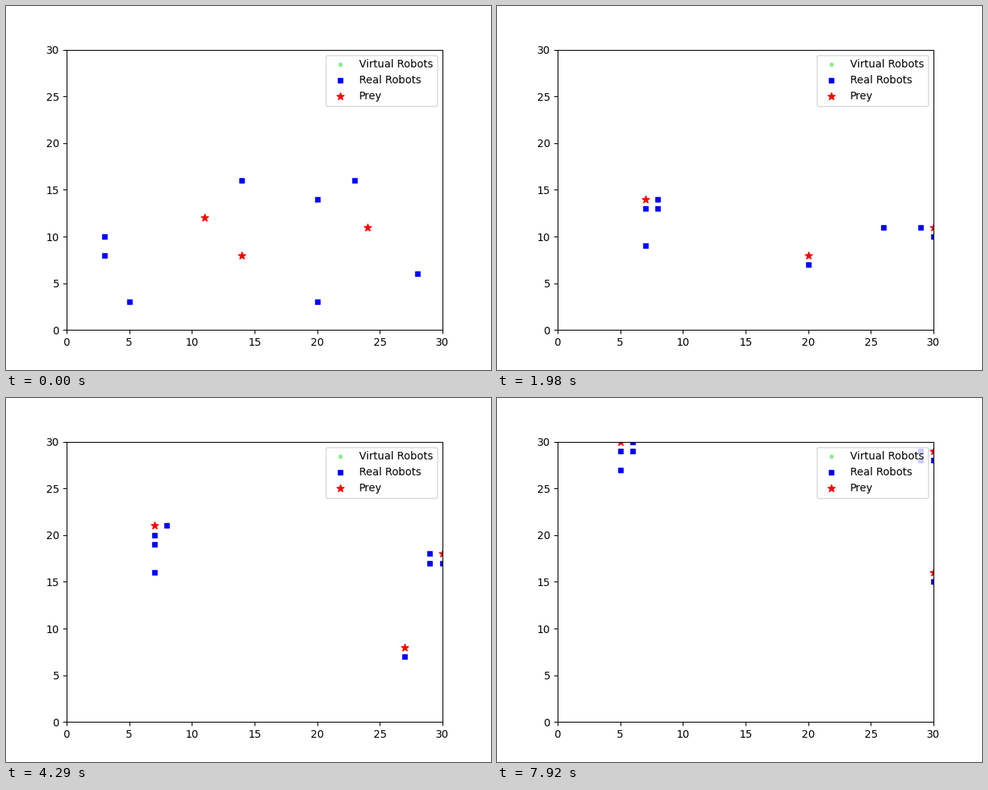
A matplotlib script that plays this animation: 640 px wide and 480 px high, repeating every 8000 ms.

```python
import matplotlib.pyplot as plt
from matplotlib.animation import FuncAnimation

LOOP_MS = 8000
TICK_MS = 40
STEP_MS = 330
SIZE = 30

EAST, WEST, NORTH, SOUTH = (1, 0), (-1, 0), (0, 1), (0, -1)

# Prey: start cell, first heading.
PREY = [((11, 12), WEST), ((14, 8), EAST), ((24, 11), EAST)]

# Robots in order of movement: start cell, hunted prey, side to take up.
ROBOTS = [
    ((3, 10), 0, WEST), ((3, 8), 0, SOUTH), ((5, 3), 0, SOUTH),
    ((14, 16), 0, EAST), ((20, 14), 2, WEST), ((23, 16), 2, WEST),
    ((20, 3), 1, SOUTH), ((28, 6), 2, SOUTH),
]


def add(a, b):
    return a[0] + b[0], a[1] + b[1]


def sign(v):
    return (v > 0) - (v < 0)


def inside(cell):
    return all(0 <= v <= SIZE for v in cell)


def approach(cell, goal, taken):
    """Step one cell towards goal, going around taken cells."""
    dx, dy = (sign(g - c) for g, c in zip(goal, cell))
    around = (dx, 0) if dx else (1, dy)
    for move in ((dx, dy), (0, dy), around):
        if add(cell, move) not in taken:
            return add(cell, move)
    return cell


def hunt(steps):
    """Cells of all robots and prey at every step."""
    robots, targets, sides = map(list, zip(*ROBOTS))
    prey, headings = map(list, zip(*PREY))
    history = [(robots[:], prey[:])]
    for _ in range(steps):
        for k, heading in enumerate(headings):
            ahead = add(prey[k], heading)
            if not inside(ahead) or ahead in robots:
                headings[k] = WEST if heading == NORTH else NORTH
                # A robot that blocked the way drops in below.
                for r, target in enumerate(targets):
                    if target == k and sides[r] == heading:
                        sides[r] = SOUTH
            prey[k] = add(prey[k], headings[k])
        for r, cell in enumerate(robots):
            goal = add(prey[targets[r]], sides[r])
            others = robots[:r] + robots[r + 1:] + prey
            robots[r] = approach(cell, goal, others)
        history.append((robots[:], prey[:]))
    return history


history = hunt(LOOP_MS // STEP_MS)

fig, ax = plt.subplots(figsize=(6.4, 4.8), dpi=100)
ax.set_xlim(0, SIZE)
ax.set_ylim(0, SIZE)

ax.scatter([], [], s=10, c="lightgreen", marker="o", label="Virtual Robots")
robot_dots = ax.scatter([], [], s=20, c="blue", marker="s", label="Real Robots")
prey_dots = ax.scatter([], [], s=50, c="red", marker="*", label="Prey")
ax.legend(loc="upper right")


def update(i):
    step = (i * TICK_MS + TICK_MS // 2) // STEP_MS
    robots, prey = history[step]
    robot_dots.set_offsets(robots)
    prey_dots.set_offsets(prey)
    return robot_dots, prey_dots


anim = FuncAnimation(fig, update, frames=LOOP_MS // TICK_MS,
                     interval=TICK_MS, repeat=True, repeat_delay=0)
plt.show()
```
